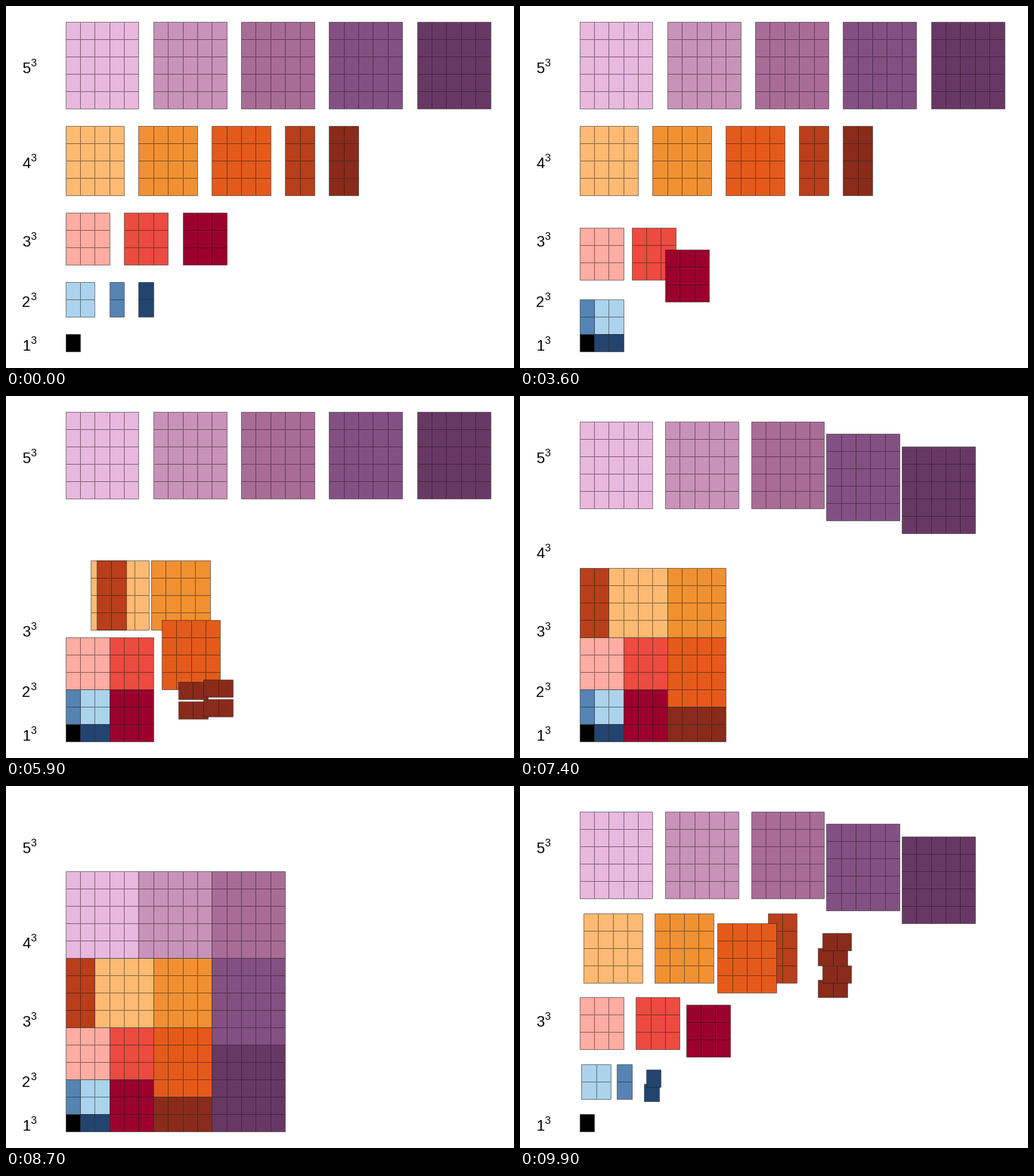
A matplotlib script for the animation above (10 s loop, 672 px wide and 480 px high).

```python
import matplotlib.pyplot as plt
import numpy as np
from matplotlib.animation import FuncAnimation
from matplotlib.patches import PathPatch
from matplotlib.path import Path

W, H, DPI = 672, 480, 100
FRAMES, INTERVAL = 100, 100
PX = 72 / DPI                      # points per pixel
CELL_W, CELL_H = 19.38, 23
LEFT, BOTTOM = 78.52, 457.9
STEP, HOLD, MOVE = 20, 13, 7       # frames per stage

SHADES = {
    1: ["#000000"],
    2: ["#abd3ec", "#5584b4", "#22446f"],
    3: ["#ffaca2", "#ed4a40", "#9c002c"],
    4: ["#feba72", "#f19031", "#e55a1a", "#b93e1b", "#8a2a1a"],
    5: ["#e8b8de", "#c992b8", "#a96c97", "#845083", "#683865"],
}


def row_base(n):
    """Bottom of the row of n cubed, in cells."""
    return (n - 1) * (n + 2) // 2


def make_blocks(n):
    """List (colour, cols, rows, start, end) for n cubed, in drawing order."""
    base, side, shades = row_base(n), n * (n - 1) // 2, SHADES[n]
    half = 0 if n % 2 else n // 2
    squares = n - 1 if half else n
    blocks = []
    for k in range(squares):
        # squares line up along the top of the smaller square, then down its side
        along = half + k * n
        end = (min(along, side), side - max(0, along - side))
        blocks.append((shades[k], n, n, (k * (n + 1), base), end))
    if half:
        # the last square splits: one half upright, one laid flat in strips
        x = squares * (n + 1)
        blocks.append((shades[-2], half, n, (x, base), (0, side)))
        for i in range(n):
            end = (side + half * (i % 2), i // 2)
            blocks.append((shades[-1], half, 1, (x + half + 1, base + i), end))
    return sorted(blocks, key=lambda b: -b[4][1])


def progress(n, frame):
    """0 in the cube's row, 1 in the big square."""
    forward = (frame - STEP * (n - 2) - HOLD) / MOVE
    back = (FRAMES - frame) / MOVE
    return float(np.clip(min(forward, back), 0, 1))


def grid_path(u, v, cols, rows):
    """Outline of a block plus its inner grid lines."""
    pts = [(0, 0), (cols, 0), (cols, rows), (0, rows), (0, 0)]
    codes = [Path.MOVETO] + [Path.LINETO] * 4
    inner = [[(i, 0), (i, rows)] for i in range(1, cols)]
    inner += [[(0, j), (cols, j)] for j in range(1, rows)]
    for line in inner:
        pts += line
        codes += [Path.MOVETO, Path.LINETO]
    x, y = np.array(pts, float).T
    return Path(np.column_stack([LEFT + CELL_W * (u + x),
                                 BOTTOM - CELL_H * (v + y)]), codes)


fig = plt.figure(figsize=(W / DPI, H / DPI), dpi=DPI, facecolor="white")
ax = fig.add_axes([0, 0, 1, 1])
ax.set_xlim(0, W)
ax.set_ylim(H, 0)
ax.axis("off")

blocks, labels = [], {}
for n in SHADES:
    for color, cols, rows, start, end in make_blocks(n):
        patch = PathPatch(grid_path(*start, cols, rows), facecolor=color,
                          edgecolor=(0.1, 0.1, 0.1, 0.5), linewidth=0.7,
                          joinstyle="miter", snap=True)
        ax.add_patch(patch)
        blocks.append((patch, n, cols, rows, np.array(start), np.array(end)))

    mid = 458.5 - CELL_H * (row_base(n) + n / 2)
    labels[n] = [
        ax.text(x, mid + dy, s, fontsize=size * PX, family="Liberation Sans")
        for s, x, dy, size in [(str(n), 21.3, 9.7, 20), ("3", 32.1, 0.9, 14)]
    ]


def update(frame):
    for patch, n, cols, rows, start, end in blocks:
        u, v = start + (end - start) * progress(n, frame)
        patch.set_path(grid_path(u, v, cols, rows))
    # even labels vanish while their blocks travel
    for n in (2, 4):
        for text in labels[n]:
            text.set_visible(progress(n, frame) in (0, 1))


anim = FuncAnimation(fig, update, frames=FRAMES, interval=INTERVAL,
                     repeat=True, repeat_delay=0, blit=False)
plt.show()
```
